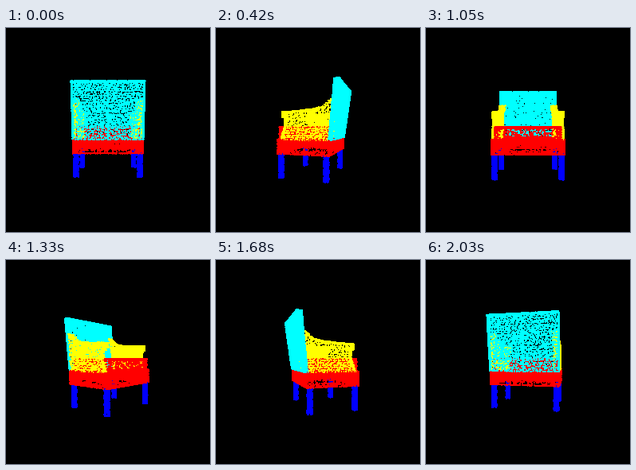
Write a matplotlib script that moves like this. It is 256x256 px and loops after 2100 ms.

```python
import numpy as np
import matplotlib.pyplot as plt
from matplotlib.animation import FuncAnimation

SIZE, FRAMES, INTERVAL = 256, 30, 70
CX, CY, DIST = 128, 124.5, 237      # vanishing point and camera distance
DOT = 1.4                           # every touched pixel fills, so dots look larger

CYAN, RED, YELLOW, BLUE = (0, 1, 1), (1, 0, 0), (1, 1, 0), (0, 0, 1)
W = 39.5                            # half width of the frame
TOP, SEAT, HEM, FLOOR = 49.5, -13.5, -29.4, -56.8
FRONT, REAR = -34.5, 24.8

rng = np.random.default_rng(7)
clouds, tints = [], []


def add(color, x, y, z):
    pts = np.column_stack(np.broadcast_arrays(x, y, z)).astype(float)
    clouds.append(pts)
    tints.append(np.tile(color, (len(pts), 1)))


def sheet(u0, u1, v0, v1, step):
    """Jittered, staggered grid over a rectangle."""
    nu = max(2, round((u1 - u0) / step) + 1)
    nv = max(2, round((v1 - v0) / step) + 1)
    u, v = np.meshgrid(np.linspace(u0, u1, nu), np.linspace(v0, v1, nv))
    u[1::2] += step / 2
    u = u + rng.uniform(-0.3, 0.3, u.shape) * step
    v = v + rng.uniform(-0.3, 0.3, v.shape) * step
    return np.clip(u, u0, u1).ravel(), np.clip(v, v0, v1).ravel()


def back_z(y):
    return np.interp(y, [SEAT, TOP], [26.0, 35.2])


def back_depth(y):
    return np.interp(y, [SEAT, TOP], [2.0, 5.2])


def arm_top(z):
    return np.interp(z, [-29, -10, 8, 18, 28], [16.6, 17.6, 19.2, 21.6, 30])


def arm_front(y):
    return np.interp(y, [SEAT, -6, 2, 9, 11.5, 17],
                     [-30.5, -28, -25.5, -25.5, -29, -29])


def make_back():
    x, y = sheet(-W, W, SEAT, TOP, 2.5)
    add(CYAN, x, y, back_z(y))
    y = np.linspace(SEAT, TOP, 60)
    add(CYAN, 0, y, back_z(y))
    x, y = sheet(-W, W, 0, TOP, 2.4)
    keep = (np.abs(x) < 34) | (y > 27)
    x, y = x[keep], y[keep]
    add(CYAN, x, y, back_z(y) - back_depth(y))
    x, t = sheet(-W, W, 0, 5, 1.6)
    add(CYAN, x, TOP, back_z(TOP) - t / 5 * back_depth(TOP))
    for side in (-W, W):
        y, t = sheet(SEAT, TOP, 0, 4, 1.4)
        add(CYAN, side, y, back_z(y) - t / 4 * back_depth(y))


def make_arm(side):
    for x, step in ((W, 2.4), (34, 2.5)):
        z, y = sheet(-30.5, 28, SEAT, 30, step)
        keep = ((y < arm_top(z)) & (z > arm_front(y))
                & (z < back_z(y) - back_depth(y) + rng.uniform(-1, 1, z.shape)))
        add(YELLOW, side * x, y[keep], z[keep])
    x, z = sheet(32, W, -29, 28, 2.0)
    add(YELLOW, side * x, arm_top(z), z)
    x, y = sheet(31.5, W, SEAT, 16.5, 1.7)
    keep = (x > 34) | (y > 8)
    x, y = x[keep], y[keep]
    add(YELLOW, side * x, y, arm_front(y))


def base_panel(u0, u1, step, level, lo, hi):
    """Panel with a dashed groove between lo and hi at the given height."""
    u, y = sheet(u0, u1, HEM, SEAT, step)
    gap = (np.abs(y - level) < 1.2) & (u > lo) & (u < hi)
    keep = ~gap | (rng.random(u.shape) < 0.3)
    return u[keep], y[keep]


def make_base():
    x, y = base_panel(-W, W, 1.7, -27.3, -30, 30)
    add(RED, x, y, REAR)
    x, y = base_panel(-W, W, 1.7, -23.8, -25, 25)
    add(RED, x, y, FRONT)
    for side in (-W, W):
        z, y = base_panel(FRONT, REAR, 1.8, -23.8, -18, 20)
        add(RED, side, y, z)


def make_cushion():
    half, low, high = 35.6, -13.0, 0.0
    x, y = sheet(-half, half, low, high, 1.7)
    rim = (np.abs(x) > 31) | (y > -2.4) | (y < -11)
    keep = rim | (rng.random(x.shape) < 0.5)
    add(RED, x[keep], y[keep], FRONT + 0.3)
    x, z = sheet(-half, half, FRONT, 22, 2.8)
    add(RED, x, high, z)
    for side in (-half, half):
        z, y = sheet(FRONT, 22, low, high, 2.4)
        add(RED, side, y, z)


def make_leg(x, z):
    y = rng.uniform(FLOOR, HEM, 420)
    a = rng.uniform(0, 2 * np.pi, 420)
    r = 2.4 + 0.3 * np.sin((y - FLOOR) * 0.75)
    add(BLUE, x + r * np.cos(a), y, z + r * np.sin(a))


make_back()
for s in (-1, 1):
    make_arm(s)
make_base()
make_cushion()
for lx in (-36.5, 36.5):
    for lz in (-31.5, 20.8):
        make_leg(lx, lz)

X, Y, Z = np.vstack(clouds).T
RGB = np.vstack(tints)


def project(i):
    """Screen positions and colours, far dots first."""
    a = 2 * np.pi * i / FRAMES
    x = X * np.cos(a) + Z * np.sin(a)
    z = Z * np.cos(a) - X * np.sin(a)
    k = 1 / (1 - z / DIST)
    order = np.argsort(z)
    return np.column_stack((CX + x * k, CY - Y * k))[order], RGB[order]


fig = plt.figure(figsize=(4, 4), dpi=64, facecolor="black")
ax = fig.add_axes([0, 0, 1, 1])
ax.set_xlim(0, SIZE)
ax.set_ylim(SIZE, 0)
ax.axis("off")

xy, rgb = project(0)
dots = ax.scatter(xy[:, 0], xy[:, 1], s=(DOT * 72 / 64) ** 2, c=rgb,
                  edgecolors="none", linewidths=0, antialiased=False)


def update(i):
    xy, rgb = project(i)
    dots.set_offsets(xy)
    dots.set_facecolor(rgb)
    return (dots,)


anim = FuncAnimation(fig, update, frames=FRAMES, interval=INTERVAL,
                     repeat=True, repeat_delay=0, blit=False)
plt.show()
```
